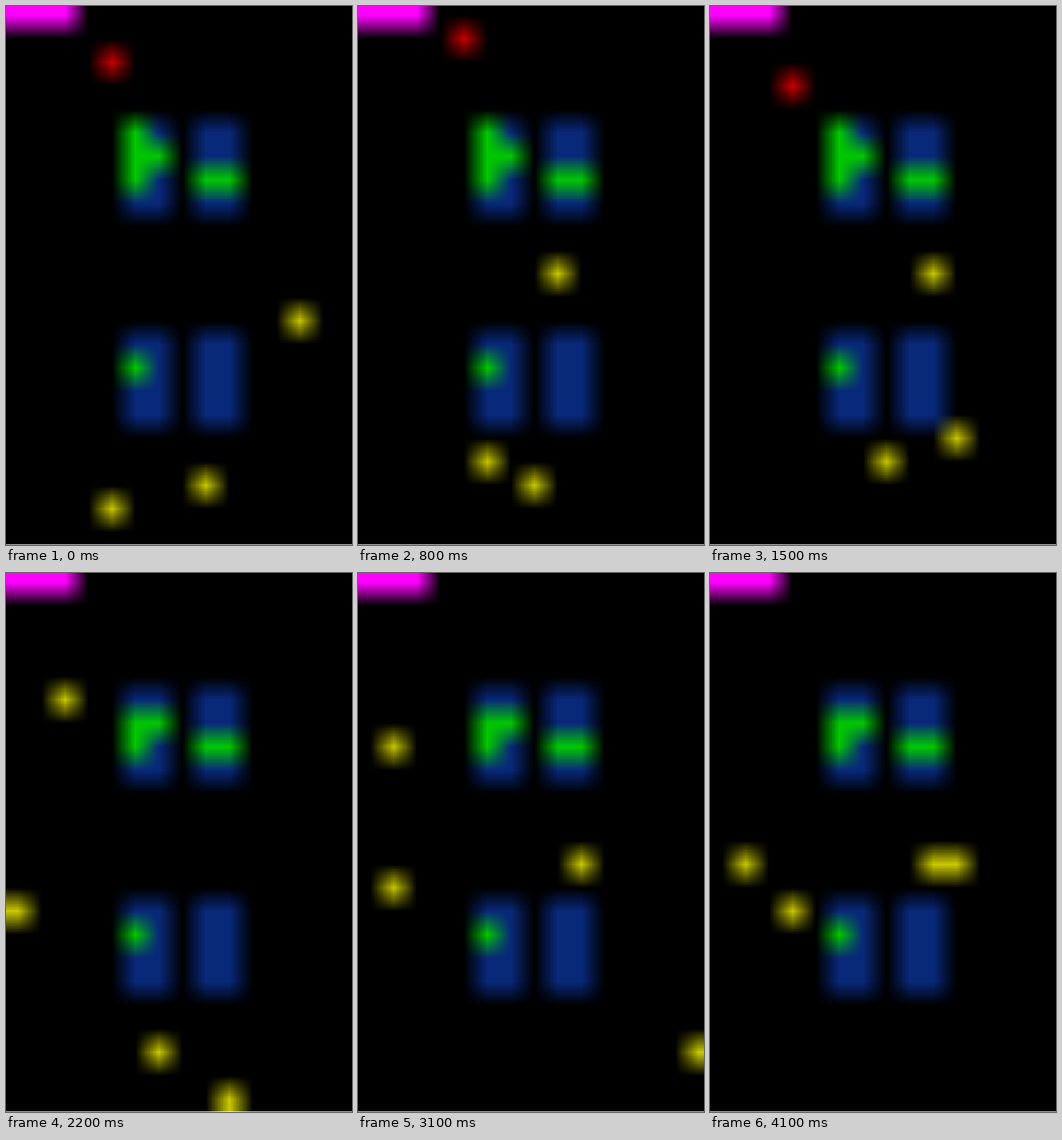
Write an HTML page with a canvas that moves like this. It is 600 px wide and 933 px high and loops after 4200 ms.

```html
<!DOCTYPE html>
<html>
<head>
<meta charset="utf-8">
<style>
  html, body { margin: 0; height: 100%; overflow: hidden; background: #000; }
  canvas { display: block; }
</style>
</head>
<body>
<canvas id="stage" width="600" height="933"></canvas>
<script>
const STEP = 100, STEPS = 42, CURE_STEP = 19;
const COLS = 15, ROWS = 23, PITCH = 40.68;
const BLUE = '#08287a', GREEN = '#00c800', YELLOW = '#c8c800', RED = '#c80000';

// Every walker reaches its next [column, row] stop at these steps.
const stopSteps = [0, 4, 11, 15, 22, 31, 41];
const walkers = [
  [[4, 2], [7, 1], [3, 2], [3, 3], [2, 5], [1, 7], [1, 12]],
  [[12, 13], [11, 10], [6, 12], [9, 11], [0, 14], [1, 13], [3, 14]],
  [[4, 21], [5, 19], [5, 19], [7, 19], [6, 20], [9, 12], [9, 12]],
  [[8, 20], [7, 19], [7, 20], [10, 18], [9, 22], [14, 20], [10, 12]]
];

const stage = document.getElementById('stage').getContext('2d');
const grid = document.createElement('canvas');
grid.width = COLS;
grid.height = ROWS + 1;
const cells = grid.getContext('2d');

function fill(color, x, y, w = 1, h = 1) {
  cells.fillStyle = color;
  cells.fillRect(x, y, w, h);
}

// Seeded noise from -1 to 1
function noise(seed) {
  const n = Math.sin(seed * 12.9898) * 43758.5453;
  return (n - Math.floor(n)) * 2 - 1;
}

// Heads for the next stop, straying up to a cell on the way.
function position(id, step) {
  const next = Math.max(1, stopSteps.findIndex(s => s >= step));
  const from = stopSteps[next - 1], to = stopSteps[next];
  const k = (step - from) / (to - from);
  const stray = k > 0 && k < 1 ? 0.8 : 0;
  return [COLS, ROWS].map((size, axis) => {
    const a = walkers[id][next - 1][axis], b = walkers[id][next][axis];
    const p = Math.round(a + (b - a) * k + stray * noise(step * 8 + id * 2 + axis));
    return Math.min(size - 1, Math.max(0, p));
  });
}

function draw(now) {
  const step = Math.floor(now / STEP) % STEPS;
  const ill = step < CURE_STEP;

  fill('#000', 0, 0, COLS, ROWS);
  for (let id = walkers.length - 1; id >= 0; id--) {
    fill(id === 0 && ill ? RED : YELLOW, ...position(id, step));
  }

  fill('#f0f', 0, 0, 3);
  for (const x of [5, 8]) for (const y of [5, 14]) fill(BLUE, x, y, 2, 4);
  fill(GREEN, 5, 6, 2);
  fill(GREEN, 5, 7);
  fill(GREEN, 8, 7, 2);
  fill(GREEN, 5, 15);
  if (ill) fill(GREEN, 5, 5);

  // Repeat the last row so it runs off the stage edge.
  cells.drawImage(grid, 0, ROWS - 1, COLS, 1, 0, ROWS, COLS, 1);

  // Smooth enlargement turns the cells into soft glows.
  stage.imageSmoothingQuality = 'low';
  stage.drawImage(grid, -0.4, -5.5, COLS * PITCH, (ROWS + 1) * PITCH);
  stage.fillStyle = '#fff';
  stage.fillRect(0, 932, 600, 1);
}

const start = performance.now();
function loop() {
  draw(performance.now() - start);
  requestAnimationFrame(loop);
}
loop();
</script>
</body>
</html>
```
